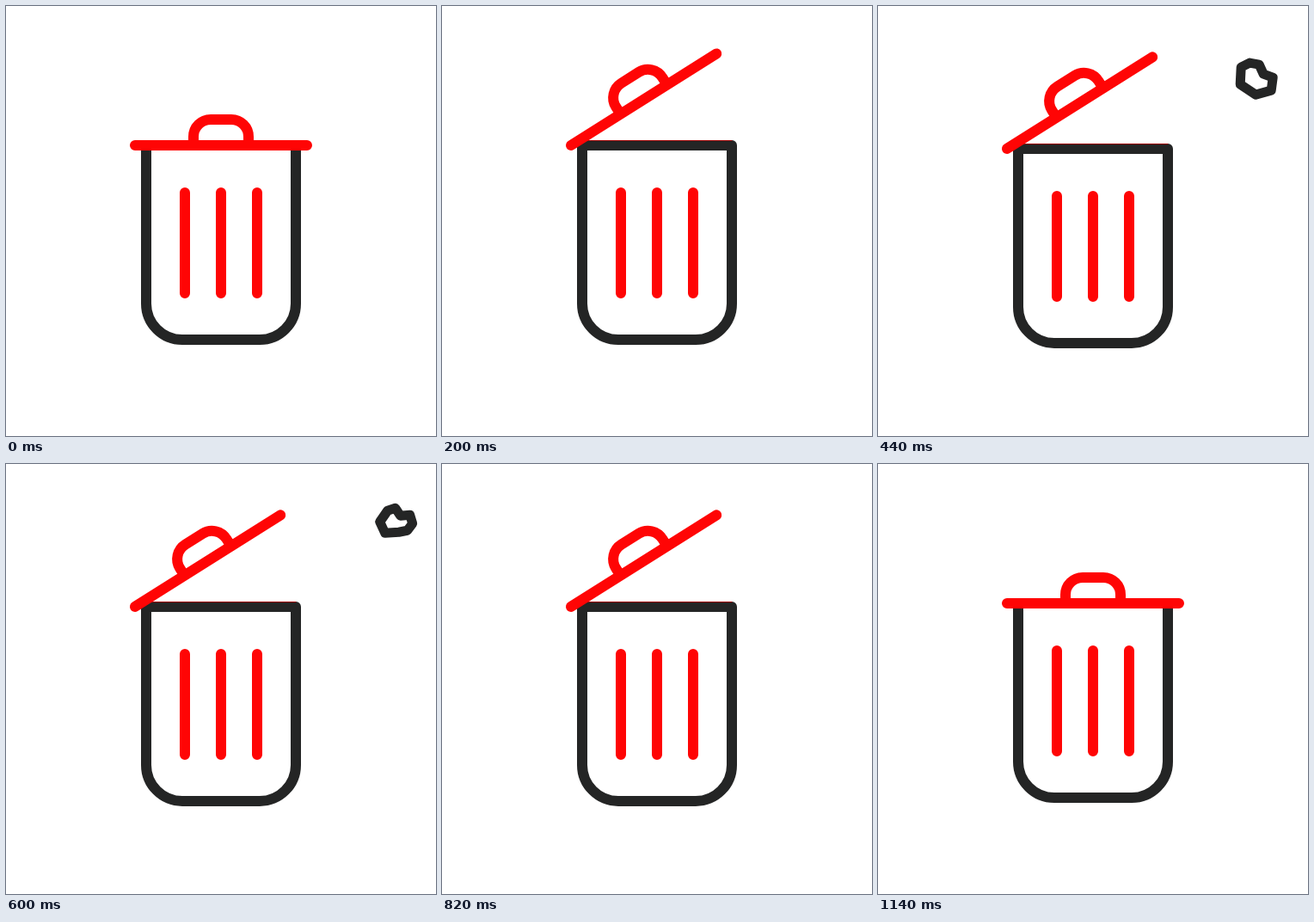
An HTML page for the animation above (1.36 s loop, 500 by 500 pixels).

```html
<!DOCTYPE html>
<html lang="en">
<head>
<meta charset="utf-8">
<title>Trash bin</title>
<style>
  html, body { margin: 0; height: 100%; overflow: hidden; background: #fff; }
  svg { display: block; width: 100vw; height: 100vh; }
  path { fill: none; stroke-width: 12; stroke-linecap: round; stroke-linejoin: round; }
  .dark { stroke: #242525; }
  .red { stroke: #ff0505; }
  .ball { stroke-width: 11; }
</style>
</head>
<body>
<svg viewBox="0 0 500 500">
  <g id="balls"></g>
  <g id="bin">
    <path class="dark" style="fill: #fff" d="M163 162H337V346a42 42 0 0 1-42 42H205a42 42 0 0 1-42-42Z"/>
    <path style="stroke: #a00808; stroke-width: 1" d="M169 156.5H337"/>
    <path class="red" d="M208 217V334M250 217V334M292 217V334"/>
    <g id="lid">
      <path class="red" d="M150 162H350M218 160V152a20 20 0 0 1 20-20h24a20 20 0 0 1 20 20v8"/>
    </g>
  </g>
</svg>
<script>
const LOOP = 1360, STEP = 20, FLIGHT = 200, SPIN = 120, OPEN = 32.2;

// Crumpled paper outlines, centred on 0,0
const wide = 'M-18-13L-8-18L3-16L8-5L19-1L17 14L-1 19L-19 7Z';
const flat = 'M-10-12L-1-15L5-6L16-7L19 3L13 11L3 13L-13 14L-19 1Z';
const balls = [
  { start: 215, x: 535, y: 66, shape: flat },
  { start: 375, x: 526, y: 80, shape: wide },
  { start: 535, x: 546, y: 61.5, shape: flat },
];

const find = id => document.getElementById(id);
const bin = find('bin'), lid = find('lid');

for (const ball of balls) {
  ball.node = document.createElementNS('http://www.w3.org/2000/svg', 'path');
  ball.node.setAttribute('class', 'dark ball');
  ball.node.setAttribute('d', ball.shape);
  find('balls').append(ball.node);
}

const progress = (t, from, to) => Math.min(1, Math.max(0, (t - from) / (to - from)));
const ease = u => (1 - Math.cos(Math.PI * u)) / 2;
const dip = (t, from, length, depth) => depth * Math.sin(Math.PI * progress(t, from, from + length));

function draw(t) {
  const angle = OPEN * (ease(progress(t, 20, 200)) - ease(progress(t, 920, 1080)));
  let drop = dip(t, 1080, 60, 4);

  for (const { start, x, y, node } of balls) {
    const u = (t - start) / FLIGHT;
    drop += dip(t, start + FLIGHT, 110, 6);
    node.style.display = u > 0 && u < 1 ? '' : 'none';
    const left = x + (262 - x) * u, top = y + (200 - y) * u ** 3;
    node.setAttribute('transform', `translate(${left} ${top}) rotate(${-SPIN * (u - 0.325)})`);
  }

  bin.setAttribute('transform', `translate(0 ${drop})`);
  lid.setAttribute('transform', `rotate(${-angle} 150 162)`);
}

const began = performance.now();
function tick() {
  const t = (performance.now() - began) % LOOP;
  draw(Math.floor(t / STEP) * STEP);
  requestAnimationFrame(tick);
}
tick();
</script>
</body>
</html>
```
